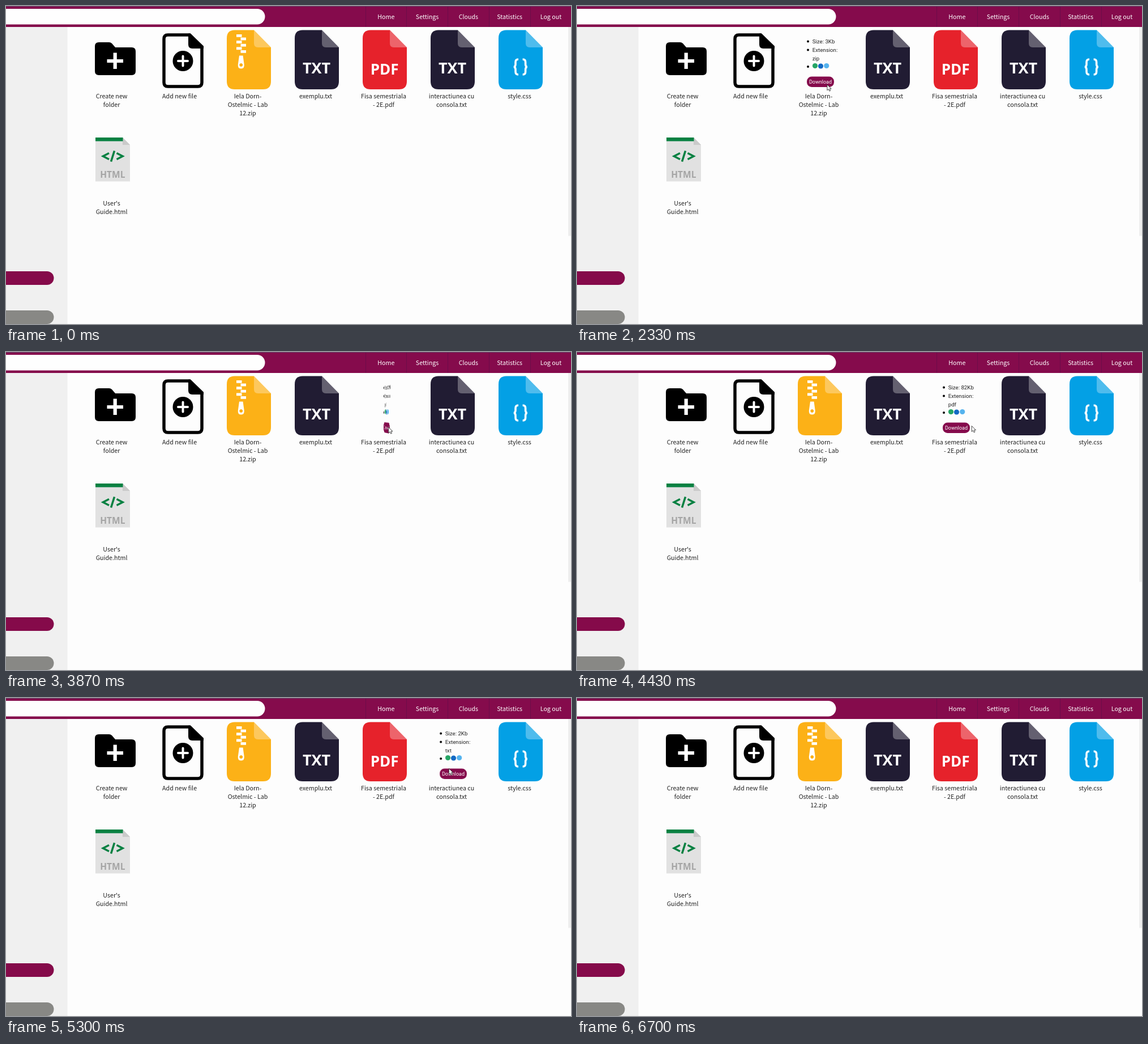
These frames come from a looping animation (998x561 px, 6730 ms). An HTML page:

```html
<!DOCTYPE html>
<html lang="en">
<head>
<meta charset="utf-8">
<title>File manager</title>
<style>
html, body { margin: 0; width: 100%; height: 100%; overflow: hidden; background: #fdfdfd; }
#stage { position: absolute; left: 0; top: 0; width: 998px; height: 561px; overflow: hidden; }
svg { position: absolute; left: 0; top: 0; overflow: visible; }
text { font: 10.7px "Noto Sans CJK JP", "Noto Sans CJK SC", "Noto Sans", sans-serif; fill: #222; }
.mid { text-anchor: middle; }
.nav text { fill: #fff; }
.bold { font: bold 27px "Open Sans", "Noto Sans", sans-serif; text-anchor: middle; fill: #fff; }
.info text { font: 9.7px Roboto, "Liberation Sans", sans-serif; }
.card { position: absolute; top: 37px; width: 86px; height: 115px; perspective: 1000px; }
.inner { width: 100%; height: 100%; transform-style: preserve-3d; }
.inner svg { backface-visibility: hidden; }
.inner .info { transform: rotateY(180deg); }
</style>
</head>
<body>
<div id="stage">
  <svg id="page" width="998" height="561">
    <rect y="37" width="108.5" height="524" fill="#f0f0f0"/>
    <rect x="993" y="37" width="5" height="368.5" fill="#eee"/>
    <rect width="998" height="37" fill="#850b4c"/>
    <rect width="998" height="1" fill="#624668"/>
    <rect x="-30" y="5" width="487.5" height="27.5" rx="13.7" fill="#fefefe"/>
    <rect x="-30" y="468" width="114.5" height="24" rx="12" fill="#850a4a"/>
    <rect x="-30" y="537" width="114.5" height="24" rx="12" fill="#888885"/>

    <!-- new folder -->
    <path d="M164 64H182Q185 64 187 66L193 73H222Q229 73 229 80V115Q229 122 222 122H164Q157 122 157 115V71Q157 64 164 64Z"/>
    <path d="M178.5 97H207M192.7 82.5V111" stroke="#fff" stroke-width="6.2"/>

    <!-- new file -->
    <path d="M324 51H286Q279 51 279 58V135Q279 142 286 142H339Q346 142 346 135V72Z" fill="#fdfdfd" stroke="#000" stroke-width="5.5"/>
    <path d="M322 48.5H326L349 71V75H329Q322 75 322 68Z"/>
    <circle cx="312.5" cy="97" r="18"/>
    <path d="M304 97H321M312.5 88.5V105.5" stroke="#fff" stroke-width="4" stroke-linecap="round"/>

    <!-- web page file -->
    <path d="M158 232H206L219 245V309.500H158Z" fill="#e1e1e1"/>
    <path d="M206 232L219 245H206Z" fill="#cacaca"/>
    <rect x="158" y="232" width="48.500" height="6.500" fill="#088142"/>
    <path d="M182 259.500L171.500 265L182 270.500M191.500 255.500L185.500 274.500M195.500 259.500L206 265L195.500 270.500" fill="none" stroke="#088142" stroke-width="3.6"/>
    <text class="bold" x="188.300" y="302.500" style="font-size:15.5px;fill:#a5a5a5">HTML</text>
  </svg>
  <svg id="pointer" width="12" height="16">
    <path d="M.7 .7V10.800L3 8.700L4.700 12.200L6.500 11.300L4.900 8H8Z" fill="#fff" stroke="#333" stroke-width=".9"/>
  </svg>
</div>
<script>
const LOOP = 6730, FLIP = 800;
const stage = document.getElementById('stage');
const page = document.getElementById('page');
const pointer = document.getElementById('pointer');

const label = (x, y, lines) => lines.map((s, i) =>
  `<text class="mid" x="${x}" y="${y + i * 15}">${s}</text>`).join('');

const nav = ['Home', 'Settings', 'Clouds', 'Statistics', 'Log out'].map((s, i) => {
  const x = 635 + i * 72.8;
  return `<path d="M${Math.floor(x)}.500 1V37" stroke="#6c0c49"/>` + label(x + 36.3, 23, [s]);
}).join('');

page.insertAdjacentHTML('beforeend', `<g class="nav">${nav}</g>` +
  label(186.6, 163, ['Create new', 'folder']) +
  label(306.6, 163, ['Add new file']) +
  label(186.6, 351.6, ["User's", 'Guide.html']));

// Faces share one local coordinate space: x from 390, y from 37.
const box = 'width="86" height="115" viewBox="390 37 86 115"';
const mark = (s, y, size) => `<text class="bold" x="428.600" y="${y}" style="font-size:${size}px">${s}</text>`;

const teeth = [0, 1, 2, 3, 4, 5].map(i =>
  `<rect x="${i % 2 ? 414.5 : 407}" y="${50 + i * 5.6}" width="9.500" height="4.800"/>`).join('');
const zipper = `<g fill="#fff">${teeth}
  <path fill-rule="evenodd" d="M412 87.500H418.500L420.700 103Q421.500 110.500 415.200 110.500Q409 110.500 409.800 103ZM415.200 101A3 3 0 1 0 415.300 101Z"/></g>`;
const brace = 'q-5 0-5 5v4q0 4-3 4.500q3 .5 3 4.500v4q0 5 5 5';
const braces = `<g fill="none" stroke="#fff" stroke-width="3.600">
  <path d="M425 94${brace}"/><path transform="matrix(-1 0 0 1 857.600 0)" d="M425 94${brace}"/></g>`;

const front = (color, art) => `<svg ${box}>
  <path fill="${color}" d="M404 42.500H438L468 73V133Q468 147 454 147H404Q390 147 390 133V56.500Q390 42.500 404 42.500Z"/>
  <path fill="#fff" opacity=".3" d="M438 42.500L468 73H445Q438 73 438 66Z"/>${art}</svg>`;

const back = (size, ext) => `<svg class="info" ${box}>
  <circle cx="408" cy="62.500" r="2"/><circle cx="408" cy="77.500" r="2"/><circle cx="408" cy="107" r="2"/>
  <text x="415.700" y="66">Size: ${size}</text>
  <text x="415.700" y="81">Extension:</text><text x="415.700" y="96">${ext}</text>
  <circle cx="420.500" cy="105.500" r="4.600" fill="#25a565"/>
  <circle cx="430.500" cy="106" r="4.600" fill="#1269c4"/>
  <circle cx="440.700" cy="105.500" r="4.600" fill="#55b3ee"/>
  <rect x="406" y="124.500" width="48" height="18.500" rx="8.500" fill="#850b4c"/>
  <text class="mid" x="430" y="137" style="fill:#fff;font-size:9px">Download</text></svg>`;

// enter / leave: when the pointer is over the card
const cards = [
  { x: 390, color: '#fcb117', art: zipper, name: ['Iela Dorn-', 'Ostelmic - Lab', '12.zip'],
    size: '3Kb', ext: 'zip', enter: 1600, leave: 2500 },
  { x: 510, color: '#211c33', art: mark('TXT', 119, 27), name: ['exemplu.txt'],
    size: '1Kb', ext: 'txt', enter: 2640, leave: 3050 },
  { x: 630, color: '#e6222b', art: mark('PDF', 120.5, 26), name: ['Fisa semestriala', '- 2E.pdf'],
    size: '82Kb', ext: 'pdf', enter: 3606, leave: 4540 },
  { x: 750, color: '#211c33', art: mark('TXT', 119, 27), name: ['interactiunea cu', 'consola.txt'],
    size: '2Kb', ext: 'txt', enter: 4670, leave: 5453 },
  { x: 870, color: '#03a0e5', art: braces, name: ['style.css'],
    size: '4Kb', ext: 'css', enter: LOOP, leave: LOOP }
];

for (const c of cards) {
  page.insertAdjacentHTML('beforeend', label(c.x + 37, 163, c.name));
  const el = document.createElement('div');
  el.className = 'card';
  el.style.left = c.x + 'px';
  el.innerHTML = `<div class="inner">${front(c.color, c.art)}${back(c.size, c.ext)}</div>`;
  c.inner = el.firstChild;
  stage.insertBefore(el, pointer);
}

// The CSS "ease" curve, solved by bisection
function ease(x) {
  if (x <= 0) return 0;
  if (x >= 1) return 1;
  const curve = (s, a, b) => 3 * (1 - s) * (1 - s) * s * a + 3 * (1 - s) * s * s * b + s * s * s;
  let lo = 0, hi = 1;
  for (let i = 0; i < 20; i++) {
    const m = (lo + hi) / 2;
    if (curve(m, .25, .25) < x) lo = m; else hi = m;
  }
  return curve(lo, .1, 1);
}

function turn(c, t) {
  const open = ease((Math.min(t, c.leave) - c.enter) / FLIP);
  return t > c.leave && open ? open * (1 - ease((t - c.leave) / (FLIP * open))) : open;
}

// Pointer path: time, x, y
const path = [
  [665, 402, 545], [730, 404, 512], [1000, 411, 425], [1430, 421, 323], [1600, 428, 190],
  [1720, 435, 148], [2000, 440, 139], [2330, 441, 138], [2500, 476, 137], [2640, 510, 137],
  [3050, 596, 136], [3606, 630, 134], [3870, 675, 132], [4350, 682, 131], [4540, 716, 128],
  [4670, 750, 125], [4900, 779, 122], [5350, 782, 124], [5453, 783, 152], [5600, 787, 470],
  [5645, 788, 540]
];

function movePointer(t) {
  const i = path.findIndex(p => p[0] > t);
  pointer.style.display = i > 0 ? '' : 'none';
  if (i < 1) return;
  const [t0, x0, y0] = path[i - 1], [t1, x1, y1] = path[i];
  const k = (t - t0) / (t1 - t0);
  pointer.style.transform = `translate(${x0 + (x1 - x0) * k}px, ${y0 + (y1 - y0) * k}px)`;
}

function draw() {
  const t = performance.now() % LOOP;
  for (const c of cards) c.inner.style.transform = `rotateY(${turn(c, t) * 180}deg)`;
  movePointer(t);
  requestAnimationFrame(draw);
}
draw();
</script>
</body>
</html>
```
